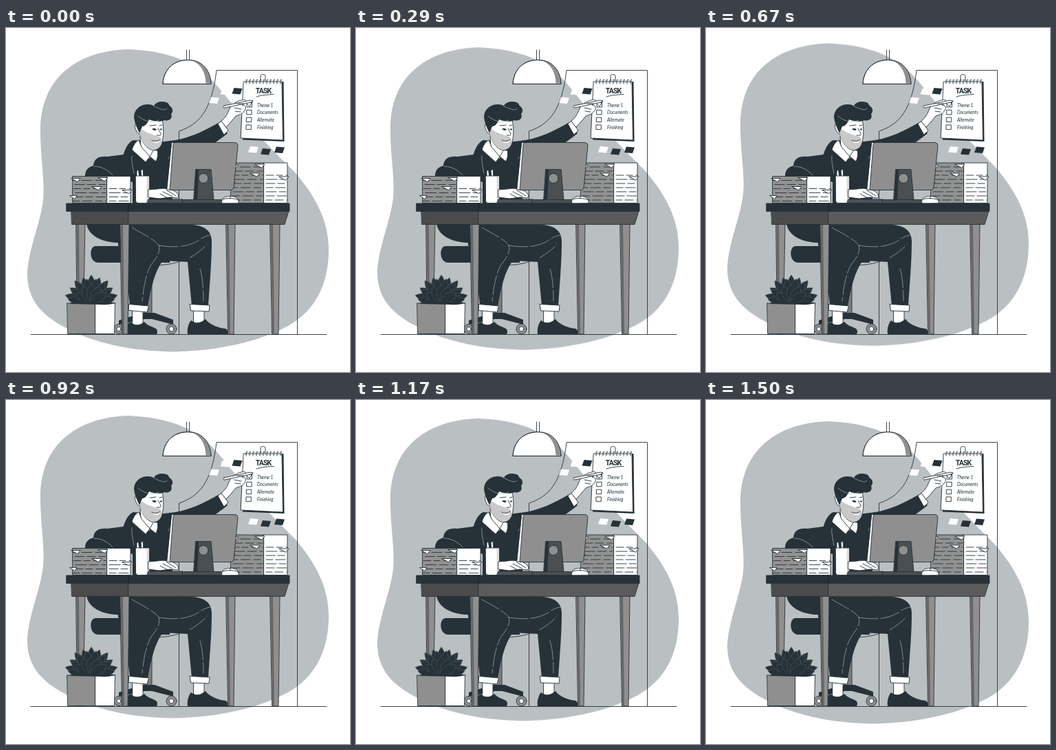
An HTML page that plays this animation: 500 by 500 pixels, repeating every 1.54 s.

```html
<!DOCTYPE html>
<html lang="en">
<head>
<meta charset="utf-8">
<title>Desk work</title>
<style>
html, body { margin: 0; width: 100%; height: 100%; overflow: hidden; background: #fff; }
svg { display: block; width: 100vw; height: 100vh; }
.d { fill: #263238; }
.w { fill: #fff; }
.g { fill: #8f8f8f; }
.o { stroke: #263238; stroke-width: .9; stroke-linejoin: round; stroke-linecap: round; }
.n { fill: none; }
.l { fill: none; stroke: #aab0b3; stroke-width: .7; stroke-linecap: round; }
.title { font: 700 10.5px Roboto, sans-serif; font-stretch: condensed; letter-spacing: -.9px; }
.note { font: italic 6.6px Lato, sans-serif; letter-spacing: -.1px; }
#blob { animation: float 770ms cubic-bezier(.37, 0, .63, 1) infinite alternate; }
@keyframes float { to { transform: translateY(-9px); } }
</style>
</head>
<body>
<svg viewBox="0 0 500 500">
  <path id="blob" fill="#babfc2" d="M178 31C120 32 50 60 50 150C50 190 57 225 54 250C50 285 31 325 31 360C32 405 65 425 95 440C140 462 195 470.5 248 470.5C330 468 385 448 415 430C455 405 469 365 469 322C469 280 450 245 420 210C390 180 355 145 330 112C300 75 275 35 178 31Z"/>

  <g id="room" class="n o">
    <path d="M251.5 445V150C281 140 299 120 306 61.5H423.5V445"/>
    <path d="M36 445.5H466"/>
  </g>

  <g id="lamp">
    <path class="n o" d="M262.5 32V46M266.500 32V46"/>
    <path class="w o" d="M228 81C229 60 244 46.500 264 46.500S297 60 298 81Z"/>
    <path class="g" d="M271 47.500C284 53 290 65 290.500 80.500H297.500C296 62 286 50 271 47.500Z"/>
    <path class="n o" d="M228 81C229 60 244 46.500 264 46.500S297 60 298 81Z"/>
  </g>

  <g id="chips"></g>

  <g id="pad">
    <path class="d" d="M348 79L403.500 78L404.500 165L344 162.500Z"/>
    <path class="w o" d="M345.500 78H401L402.500 163L341.500 160Z"/>
    <path class="n o" d="M370 77V70C370 66.500 377 66.500 377 70V77"/>
    <path class="n o" stroke-width="1.5" id="rings"/>
    <text class="d title" x="374" y="94.500" text-anchor="middle">TASK</text>
    <path class="n o" d="M364 100C372 97 380 97 389 96.500"/>
    <path class="n o" id="boxes"/>
    <path class="n o" d="M351 111L354 114L359 106"/>
    <g id="notes"></g>
  </g>

  <g id="chair">
    <path fill="#7d7d7d" class="o" d="M202 340H212V418H202Z"/>
    <path class="d" d="M198 414H216L243 424V431L212 423H202L164 431V425Z"/>
    <g class="g o"><circle cx="164" cy="437.500" r="7"/><circle cx="240.500" cy="437.500" r="7.500"/></g>
    <g class="w o"><circle cx="164" cy="437.500" r="3"/><circle cx="240.500" cy="437.500" r="3.500"/></g>
    <path class="d" d="M115 220C114 207 118 203 127 200C128 189 136 186 147 187L178 183V290H150C138 290 116 286 115 270Z"/>
    <path class="l" d="M128 201C137 201 147 205 155 214"/>
    <path class="d" d="M117 284H170V312H160C140 311 119 302 117 284Z"/>
    <path class="d" d="M130 317H238V341H134C121 341 120 318 130 317Z"/>
    <path class="n o" d="M215 345C229 345 244 343 256 338"/>
  </g>

  <g id="legs">
    <path class="w o" d="M273 408H288V430H273ZM184 407H199V432H184Z"/>
    <path class="d" d="M269 425C277 431 284 428 290 423C296 432 310 436 319 437C322 438 323 442 322 445H264C263 437 265 430 269 425Z"/>
    <path class="d" d="M181 427C188 434 195 432 201 427C206 433 213 434 218 437C221 440 220 443 219 445H171C172 436 175 431 181 427Z"/>
    <path class="d" d="M160 286H270C290 287 299 296 299 310C299 341 296 372 294 404H270L264 340L228 338C216 354 211 377 206 404H180C178 377 172 343 163 315Z"/>
    <path class="w o" d="M267.500 401.500L296 403L295 412L269 411ZM179 401.500L207.500 404L205 413L178.500 410.500Z"/>
    <path class="l" d="M183 290C200 300 216 307 222 316C225 325 219 334 211 344C203 358 200 377 198 397M222 316C246 320 266 318 281 308C288 303 292 302 297 301M267 334C277 328 286 322 292 314M282 350C286 363 287 380 287 397" stroke-dasharray="28 4"/>
  </g>

  <g id="man">
    <path class="d" d="M185 163C174 168 170 184 167 201C165 215 176 221 184 224V256H242V192L252 188C278 184 303 169 322 153L310 137C289 149 267 160 246 163L222 166Z"/>
    <path class="l" d="M186 211C184 201 182 192 183 186M236 190C240 182 245 178 252 177"/>
    <path class="w o" d="M308 139L314 135L323 149L317 155Z"/>
    <path class="w o" d="M313 135C320 130 322 124 325 117C329 110 336 106 342 105C346 103 350 105 349 108L343 112C349 112 350 117 346 121C343 126 338 126 334 128C329 134 326 138 320 144Z"/>
    <path class="w o" d="M317 113L355 105L359 106L356 108L318 116C315 116 315 114 317 113Z"/>
    <path class="n o" d="M332 116L342 118M333 121L341 122M336 110L345 110"/>

    <path class="w o" d="M195 158L196 174L208 191L215 178V165Z"/>
    <path class="w o" d="M193 163C188 165 185 171 183 177L203 195L209 187L197 173ZM214 178L209 187L218 194C221 187 221 183 220 178Z"/>
    <path class="w o" d="M192 136C187 137 186 144 190 150C191 153 193 154 195 154C197 165 202 172 209 176C217 180 225 175 227 166C230 153 229 142 226 127L205 125Z"/>
    <path fill="#c9c9c9" d="M194 147C199 147 202 151 208 153C214 155 218 157 223 158C226 161 227 165 226 168C222 178 213 178 207 174C199 169 195 161 194 147Z"/>
    <path class="w" d="M213 164C217 166 221 166 224 163C223 168 216 169 213 164Z"/>
    <path class="d" d="M194 153C190 145 187 138 186 130C186 121 191 115 199 112C206 110 211 111 215 113C218 107 227 106 233 108C237 109 236 112 239 114C244 118 242 123 240 125C243 132 236 136 230 134C226 137 215 136 208 133C206 138 202 143 198 143Z"/>
    <path class="l" d="M192 128C200 135 211 139 222 134M214 113C224 118 231 121 234 117"/>
    <path class="n o" stroke-width="2" d="M209 142L218 141M223 142L227 141"/>
    <path class="d" d="M212 147Q216 144 219 148L216 149ZM223 147L227 146L226 149Z"/>
    <path class="n o" d="M221 146C223 151 227 154 224 156L219 156M212 163C216 165 220 165 224 162M190 142L193 147"/>
  </g>

  <g id="desk" class="o">
    <path class="g" d="M102 284H115L112 445H104ZM320 284H333L331 445H323ZM384 284H398L396 445H387ZM166 284H179L177 445H169Z"/>
    <path fill="#666" stroke="none" d="M102.500 286H106L107 445H104.500ZM320.500 286H324L326 445H323.500ZM384.500 286H388L390 445H387.500ZM166.500 286H170L172 445H169.500Z"/>
    <path fill="#4b4b4b" d="M95 266H178V285.500H96Z"/>
    <path fill="#5b5b5b" d="M178 266H411L405 285.500H178Z"/>
    <path class="d" d="M88 255H412V266.500H88Z"/>
    <path stroke="#101b20" d="M178 255V266"/>
  </g>

  <g id="stacks"></g>

  <g id="tools">
    <path class="w o" d="M190 218V208L192 206L194 208V218ZM197 218L196 207L199 205L200 218Z"/>
    <path class="d" d="M193.500 216L192 207L195 206L196 216Z"/>
    <path class="w o" d="M188.500 215H208.500V251Q208.500 254.500 205 254.500H192Q188.500 254.500 188.500 251Z"/>
    <path fill="#ddd" d="M204.500 216H208V252L204.500 254Z"/>
    <path fill="#4d5357" class="o" d="M207 249H257V254.500H205Z"/>
    <path class="w o" d="M207 235L220 234C229 232 239 234 245 237C250 240 252 244 249 247L238 246L223 248L207 246Z"/>
    <path class="n o" d="M228 238L242 245M234 236L247 244M224 241L235 247"/>
    <path class="w o" d="M241 166.500L246 167L240 235H234Z"/>
    <path class="g o" d="M246 166.500H333Q337 167 337 171L331 232Q330.500 235.500 327 235.500H238L243 169Q243.500 166.500 246 166.500Z"/>
    <path fill="#4a4f52" class="o" d="M276 205.500H298L302 250H273Z"/>
    <path class="d" d="M276 206H280L278 250H273Z"/>
    <circle class="g o" cx="287" cy="218.500" r="7"/>
    <path fill="#4a4f52" class="o" d="M257 249.500H313L315 254.500H256Z"/>
    <path class="w o" d="M313.500 254.500C313 246 319 244.500 326 244.500S339 247 338 254.500ZM314 249C322 247 331 247 338 250M326 244.500V248"/>
  </g>

  <g id="plant">
    <g id="leaves" fill="#263238" stroke="#4c575c" stroke-width=".6"></g>
    <path class="g o" d="M89 400H130V444.500H90Z"/>
    <path class="w o" d="M130 400H158.500L157.500 444.500H130Z"/>
    <path class="d" d="M92 401Q108 391 125 399L160 399Q150 403 138 402Z"/>
  </g>
</svg>
<script>
const $ = id => document.getElementById(id);
const range = (n, f) => Array.from({ length: n }, (_, i) => f(i)).join('');

// Colour chips pinned to the wall
$('chips').innerHTML = [
  [302, 105.500, 'w'], [318.500, 93, 'w'], [335.500, 92, 'd'],
  [359, 177, 'w'], [377, 180, 'd'], [397, 177.500, 'd']
].map(([x, y, c]) => `<path class="${c}" d="M${x - 4} ${y - 5}l12 1l-3 8.500l-12 -1Z"/>`).join('');

$('rings').setAttribute('d', range(11, i => `M${349 + i * 5} 81v-5q1 -2.500 2 0`));
$('boxes').setAttribute('d', range(4, i => `M${350.500 - i * .4} ${108.500 + i * 10.800}h7v6.500h-7Z`));
$('notes').innerHTML = ['Theme 1', 'Documents', 'Alternate', 'Finishing'].map((s, i) =>
  `<text class="d note" x="365" y="${114.500 + i * 10.800}">${s}</text>`).join('');

// Sheets of paper: a shaded side and a lit side
function stack(x, y, mid, right) {
  const h = 254.500 - y, rows = Math.floor(h / 6);
  const line = (a, b, k) => `<path class="n o" stroke-dasharray="${9 + k * 5 % 8} 4 ${15 - k * 3 % 7} 5" d="M${a} ${y + 6 + k * 6}H${b}"/>`;
  const corner = (a, b, w) => `<path class="w o" d="M${a} ${b}h${w}l${-w * .3} 5Z"/>`;
  return `<path fill="#929292" class="o" d="M${x} ${y}H${mid}V254.500H${x}Z"/>
    <path class="w o" d="M${mid} ${y}H${right}V254.500H${mid}Z"/>` +
    range(rows, k => line(x + k * 3 % 5, mid - 2, k) + line(mid + 3, right - k * 5 % 6, k + 2)) +
    corner(x - 2, y + 3, 13) + corner(x + 28, y + 15, 14) + corner(mid - 13, y + 2, 14) +
    corner(x - 4, y + 28, 10) + corner(right - 12, y + 20, 14);
}
$('stacks').innerHTML = stack(97, 215.500, 147, 181) + stack(327, 196, 375, 409);

// Fan of leaves, outer layer first
const leaf = (angle, len, wide) =>
  `<path transform="translate(124 398) rotate(${angle})" d="M0 3C${-wide} ${-len * .3} ${-wide} ${-len * .7} 0 ${-len}C${wide} ${-len * .7} ${wide} ${-len * .3} 0 3Z"/>`;
$('leaves').innerHTML =
  range(9, i => leaf(-76 + i * 19, 39 - 2 * (i % 2), 9)) +
  range(8, i => leaf(-84 + i * 24, 34, 9)) +
  range(5, i => leaf(-60 + i * 30, 25, 9));
</script>
</body>
</html>
```
